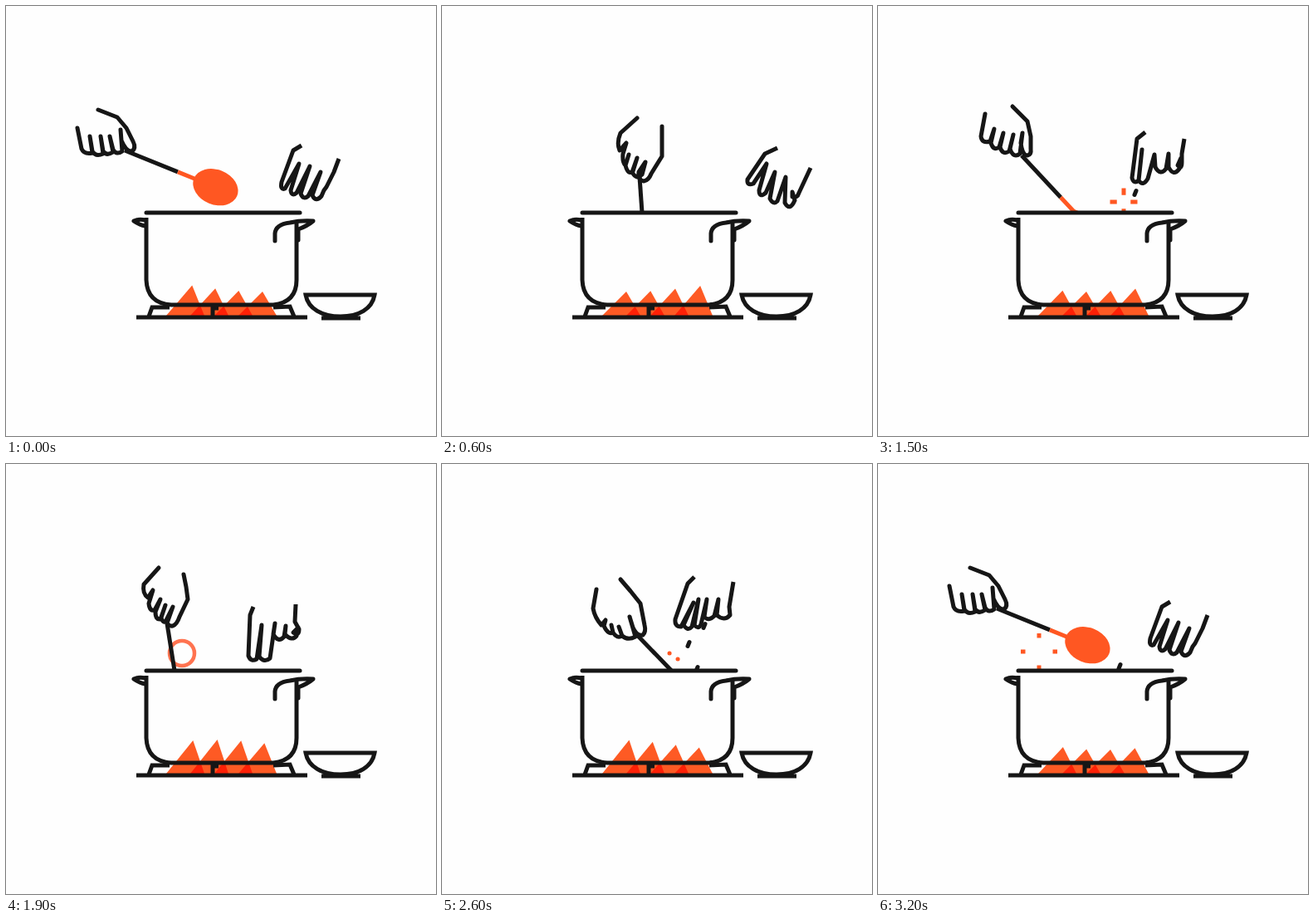
An HTML page for the animation above (3300 ms loop, 518 by 518 pixels).

```html
<!DOCTYPE html>
<html lang="en">
<head>
<meta charset="utf-8">
<title>Cooking</title>
<style>
html, body { margin: 0; height: 100%; overflow: hidden; background: #fefefe; }
svg { display: block; width: 100vw; height: 100vh; }
path, line { fill: none; stroke: #161616; stroke-width: 5; stroke-linecap: round; stroke-linejoin: round; }
.flat { stroke-linecap: butt; }
.sharp { stroke-linejoin: miter; }
.hot { stroke: #ff5722; }
#fire path { fill: #ff5a24; stroke: none; mix-blend-mode: multiply; }
</style>
</head>
<body>
<svg viewBox="0 0 518 518">
  <clipPath id="abovePot"><path d="M0 0H518V249H0Z"/></clipPath>
  <clipPath id="aboveBowl"><path d="M0 0H518V348H0Z"/></clipPath>

  <g id="fire"><path/><path/><path/><path/></g>

  <g clip-path="url(#abovePot)">
    <circle id="ring" cx="212" cy="228" fill="none" stroke="#ff7350"/>
    <path id="sparks" class="hot flat"/>
    <path id="dots" class="hot"/>
    <path id="grains"/>
    <g id="spoon">
      <line x2="69" class="flat"/>
      <line x1="69" x2="94" class="hot flat"/>
      <ellipse id="scoop" cx="118" rx="28" fill="#ff5722"/>
    </g>
  </g>
  <path id="left"/>
  <path id="right" class="flat" clip-path="url(#aboveBowl)"/>

  <!-- pot -->
  <path d="M169 249H354"/>
  <path class="flat" d="M169 255V330Q170 358 199 360H322Q350 357 350 330V259"/>
  <path d="M168 265Q161 264 154 259Q160 256 168 258"/>
  <path d="M324 283V274Q325 263 342 261Q355 258 370 259Q363 265 352 269V282"/>
  <!-- stove -->
  <path class="flat sharp" d="M157 375H363M172 374L176 363H197M347 374L342 362L322 363M249 361V374M249 364H256"/>
  <!-- bowl -->
  <path class="flat sharp" d="M361 348H444C441 365 425 374 403 374C381 374 364 365 361 348ZM380 376H427"/>
</svg>
<script>
const LOOP = 3300, STEP = 100, NUM = /[\d.]+/g;
const $ = id => document.getElementById(id);
const nums = s => s.match(NUM).map(Number);
const fill = (s, f) => { let i = 0; return s.replace(NUM, n => f(+n, i++)); };
const shift = (s, dx, dy) => fill(s, (n, i) => n + (i % 2 ? dy : dx));
const mix = (a, b) => { const v = nums(b); return fill(a, (n, i) => (n + v[i]) / 2); };

// Smooth cyclic interpolation of every number in a list of [time, text] keys
function track(keys) {
  const n = keys.length, vals = keys.map(k => nums(k[1]));
  const time = i => keys[(i + n) % n][0] + Math.floor(i / n) * LOOP;
  const val = (i, j) => vals[(i + n) % n][j];
  return t => {
    let k = n - 1;
    while (time(k) > t) k--;
    const h = time(k + 1) - time(k), u = (t - time(k)) / h;
    const slope = (i, j) => (val(i + 1, j) - val(i - 1, j)) / (time(i + 1) - time(i - 1)) * h;
    return fill(keys[0][1], (_, j) => {
      const a = val(k, j), b = val(k + 1, j), v = 1 - u;
      return (a * (1 + 2 * u) * v * v + slope(k, j) * u * v * v
        + b * (3 - 2 * u) * u * u - slope(k + 1, j) * u * u * v).toFixed(2);
    });
  };
}

// All poses of one hand share the same path commands
const grip = {
  out: "M86 147L91 172Q94 179 104 177L101 157L104 175Q108 182 117 178L114 157L117 175Q121 181 129 176L125 157L129 173Q133 180 140 175L138 149L139 162Q145 176 152 175Q157 171 153 163L145 147L134 134L111 125",
  dip: "M235 135L215 153Q210 165 214 174L222 165L218 178Q217 188 221 192L225 179L221 192Q224 204 230 199L235 183L229 200Q234 210 241 203L245 188L237 200Q236 210 243 211Q249 210 252 202L265 181L265 163L265 145",
  far: "M232 145L223 164Q221 176 226 186L228 188L234 197Q239 205 244 207L242 199L246 206Q250 210 253 208L251 202L254 208Q258 214 264 212L260 189L262 203Q265 212 271 212Q275 208 276 195L278 177L271 158L263 139",
  near: "M129 130L124 157Q125 166 135 163L140 148L136 165Q139 175 146 170L151 153L147 170Q150 180 158 175L163 155L159 172Q163 184 171 178L174 153L172 165Q174 180 180 180Q185 179 184 172L184 157L180 139L162 121",
  push: "M184 125L166 145Q164 156 171 161L177 152L172 168Q173 178 179 176L186 163L180 178Q180 188 186 187L192 170L187 185Q189 193 195 189L201 172L193 188Q195 196 201 195Q206 193 209 184L219 163L217 148L214 133",
  pull: "M186 151L182 174Q184 185 192 194L197 188L195 195Q200 206 206 203L204 194L206 203Q211 211 217 207L213 196L217 207Q224 213 233 208L226 184L230 197Q235 208 242 206Q246 202 244 194L239 168L227 153L215 139"
};
const pinch = {
  rest: "M356 168L346 174L332 212Q330 222 336 220L353 190L343 222Q344 230 350 225L366 193L355 226Q358 234 364 229L379 200L369 228Q373 237 380 229L383 222L386 218Q389 212 391 208L395 200L401 184",
  reach: "M404 171L389 178L368 209Q367 217 375 214L391 190L382 222Q382 232 390 225L401 200L395 232Q399 240 404 235L414 206L413 237Q419 248 425 234L422 224L422 230Q428 232 430 225L437 210L444 195",
  take: "M389 286L382 300L388 347Q392 360 398 347L394 307L398 347Q403 356 408 347L409 308L411 322Q416 331 421 324L424 308L422 322Q427 329 433 326L438 316L432 322Q436 328 438 318L438 305L439 286",
  toss: "M322 152L312 160L306 207Q308 215 314 210L318 173L314 210Q319 218 325 208L333 179L334 194Q340 205 347 196L350 178L350 194Q356 206 363 196L365 183L361 192Q366 198 366 188L366 178L369 160",
  hover: "M298 172L294 182L292 231Q295 239 302 235L308 194L305 232Q311 240 318 234L324 192L322 205Q328 216 335 208L337 195L336 205Q344 214 350 207L352 197L346 203Q353 208 353 199L348 190L349 169",
  sprinkle: "M304 136L296 144L281 187Q280 196 288 196L303 167L291 194Q296 202 301 196L309 163L304 194Q309 200 312 193L319 163L316 184Q321 190 328 183L333 163L331 182Q340 190 347 182L346 172L351 142"
};
// Spoon: grip point, angle, half width of the scoop as seen
const hold = {
  out: "143 174 22 21", dip: "238 206 86 8", far: "265 210 61 8",
  near: "173 180 47 7", push: "194 192 81 8", pull: "234 205 46 8"
};

const stir = p => track([[0, p.out], [600, p.dip], [1000, p.far], [1500, p.near], [1900, p.push],
  [2250, mix(p.dip, p.far)], [2600, p.pull], [3200, p.out]]);
const leftHand = stir(grip), spoon = stir(hold);
const rightHand = track([[0, pinch.rest], [600, pinch.reach], [1000, pinch.take], [1500, pinch.toss],
  [1900, pinch.hover], [2600, pinch.sprinkle], [3200, shift(pinch.rest, -4, -2)]]);

const easeOut = u => 1 - (1 - u) ** 2;

function spark(t, x, y) {
  if (t <= 0 || t > 300) return "";
  const a = t * .055, b = 22 * easeOut(t / 300);
  return [[1, 0], [-1, 0], [0, 1], [0, -1]]
    .map(([c, s]) => `M${x + c * a} ${y + s * a}L${x + c * b} ${y + s * b}`).join("");
}

function hop(t, dir, height) {
  const u = t / 400;
  return u <= 0 || u >= 1 ? "" : `M${279 + dir * 10 * u} ${249 - height * 4 * u * (1 - u)}h.1`;
}

function grain(t, x, y) {
  y += t * .2;
  return y < 194 || y > 250 ? "" : `M${x + 1} ${y - 2.5}l-2 5`;
}

function draw(now) {
  const t = Math.floor(now % LOOP / STEP) * STEP;

  [...$("fire").children].forEach((flame, i) => {
    const x = 193 + i * 29;
    const top = 338 - 6 * Math.cos((t - 175 - 80 * i) / 825 * 2 * Math.PI);
    flame.setAttribute("d", `M${x} 373L${x + 29 + (344 - top) * .3} ${top}L${x + 46} 373Z`);
  });

  $("left").setAttribute("d", leftHand(t));
  $("right").setAttribute("d", rightHand(t));
  const [x, y, angle, width] = nums(spoon(t));
  $("spoon").setAttribute("transform", `translate(${x} ${y}) rotate(${angle})`);
  $("scoop").setAttribute("ry", width);

  const u = Math.min(1, Math.max(0, (t - 1700) / 400));
  $("ring").setAttribute("r", 20 * easeOut(u));
  $("ring").setAttribute("stroke-width", u ? 9 * (1 - u) : 0);
  $("sparks").setAttribute("d", spark(t - 1350, 296, 236) + spark(t - 2900, 194, 226));
  $("dots").setAttribute("d", hop(t - 2400, -1, 21) + hop(t - 2400, 1, 14));
  $("grains").setAttribute("d", grain(t - 1500, 310, 225) + grain(t - 2600, 316, 195)
    + grain(t - 2600, 297, 217) + grain(t - 2600, 307, 247) + grain(t - 3200, 291, 244));
  requestAnimationFrame(draw);
}
draw(0);
</script>
</body>
</html>
```
